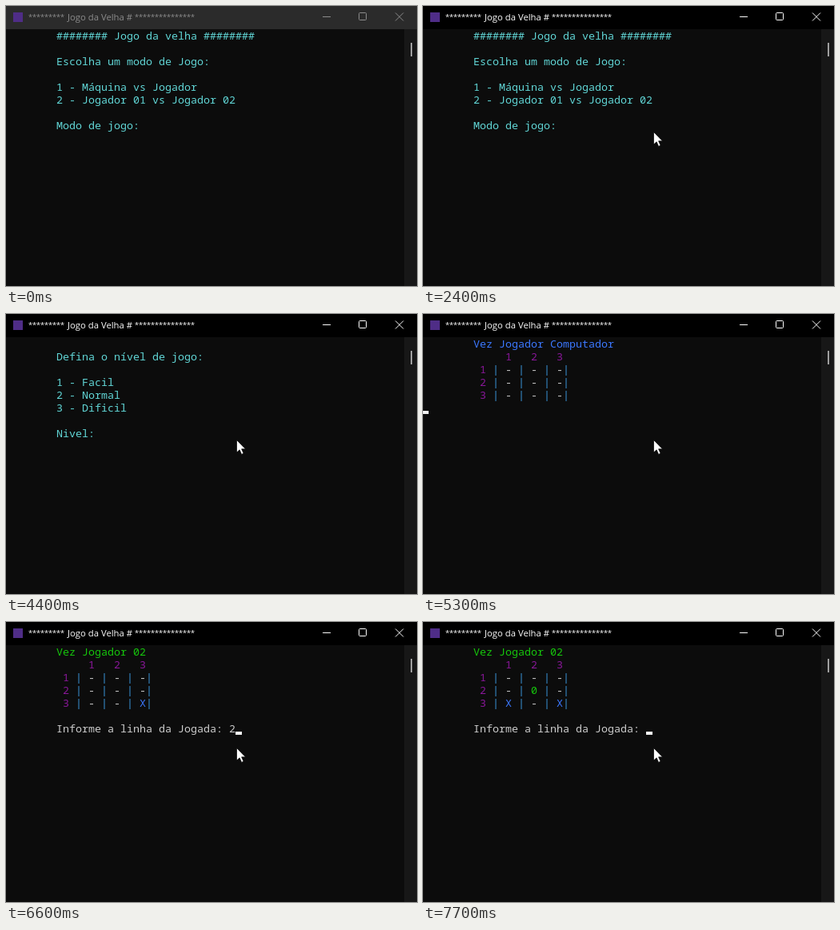
Write an HTML page that moves like this. It is 514x350 px and loops after 8000 ms.

```html
<!DOCTYPE html>
<html lang="pt">
<head>
<meta charset="utf-8">
<title>Jogo da Velha</title>
<style>
html, body { margin: 0; width: 100%; height: 100%; overflow: hidden; background: #0c0c0c; }
#win { position: absolute; left: 0; top: 0; width: 514px; height: 350px; overflow: hidden; background: #0c0c0c; }
#win > * { position: absolute; }
#chrome { left: 0; top: 0; }
#bar { fill: #2b2b2b; }
#caption { fill: #8c8c8c; font: 11.3px "Open Sans", sans-serif; }
#caption .stars { font-size: 9.07px; }
#buttons { fill: none; stroke: #8c8c8c; }
.active #bar { fill: #000; }
.active #caption { fill: #fff; }
.active #buttons { stroke: #fff; }
#screen { left: -1px; top: 29px; white-space: pre; color: #ccc;
  font: 13.333px/16px "Noto Sans Mono", monospace; font-variant-ligatures: none; }
#caret { width: 8px; height: 4px; background: #f2f2f2; }
#mouse { left: 0; top: 0; overflow: visible; }
.menu { color: #61d6d6; }
.blue { color: #3b78ff; }
.green { color: #16c60c; }
.purple { color: #881798; }
.wall { color: #3a96dd; }
</style>
</head>
<body>
<div id="win">
  <svg id="chrome" width="514" height="350">
    <rect id="bar" width="514" height="29"/>
    <rect x="9" y="8" width="12" height="12" fill="#4f2d87"/>
    <g id="caption">
      <text class="stars" x="28" y="17">*********</text>
      <text x="77" y="18">Jogo da Velha #</text>
      <text class="stars" x="161" y="17">***************</text>
    </g>
    <g id="buttons">
      <path d="M396 13.5h10M487 8.5l10 10m0-10l-10 10"/>
      <rect x="441.5" y="8.5" width="9" height="9" rx="1"/>
    </g>
    <rect x="498" y="29" width="16" height="321" fill="#171717"/>
    <rect x="506" y="46" width="2" height="17" fill="#9f9f9f"/>
  </svg>
  <div id="screen"></div>
  <div id="caret"></div>
  <svg id="mouse" width="14" height="20">
    <path d="M.5.5v15.6l3.6-3.3 2.5 5.6 2.5-1.1-2.5-5.5h4.9z" fill="#fff" stroke="#000" stroke-width=".7"/>
  </svg>
</div>
<script>
const LOOP = 8000;
const [win, screenBox, caret, mouse] =
  ['win', 'screen', 'caret', 'mouse'].map(id => document.getElementById(id));

const pad = ' '.repeat(8);
const paint = (cls, text) => `<span class="${cls}">${text}</span>`;
const menu = lines => paint('menu', lines.map(s => pad + s).join('\n'));

const modes = menu(['######## Jogo da velha ########', '', 'Escolha um modo de Jogo:', '',
  '1 - Máquina vs Jogador', '2 - Jogador 01 vs Jogador 02', '', 'Modo de jogo: ']);
const levels = menu(['', 'Defina o nível de jogo:', '', '1 - Facil', '2 - Normal', '3 - Dificil',
  '', 'Nivel: ']);

const wall = paint('wall', '|');
const mark = m => m === 'X' ? paint('blue', m) : m === '0' ? paint('green', m) : m;

function board(turn, cells) {
  const rows = [1, 2, 3].map(n => {
    const line = [...cells.slice(3 * n - 3, 3 * n)].map(m => `${wall} ${mark(m)}`).join(' ');
    return `${pad} ${paint('purple', n)} ${line}${wall}`;
  });
  return [pad + turn, paint('purple', pad + '     1   2   3'), ...rows, '', ''].join('\n');
}

const computer = paint('blue', 'Vez Jogador Computador');
const player = paint('green', 'Vez Jogador 02');
const askRow = pad + 'Informe a linha da Jogada: ';
const askCol = pad + 'Informe a coluna da Jogada: ';
const second = board(player, '--------X');

// Start time, screen content, caret column and row (no column: caret hidden)
const states = [
  [0, modes],
  [2800, modes, 22, 7],
  [3200, modes + paint('menu', '1'), 23, 7],
  [3300, modes + paint('menu', '1'), 0, 8],
  [3400, ''],
  [3500, levels, 15, 7],
  [4400, levels],
  [4900, levels, 15, 7],
  [5000, levels + paint('menu', '1'), 16, 7],
  [5200, levels + paint('menu', '1'), 0, 8],
  [5300, board(computer, '---------'), 0, 5],
  [5700, second],
  [5800, second + askRow, 35, 6],
  [6300, second + askRow],
  [6600, second + askRow + '2', 36, 6],
  [6800, second + askRow + '2\n' + askCol, 36, 7],
  [7100, second + askRow + '2\n' + askCol + '2', 37, 7],
  [7200, board(computer, '----0---X'), 0, 5],
  [7700, board(player, '----0-X-X') + askRow, 35, 6],
];

const path = [[230, 184], [257, 171], [279, 161], [288, 157]];
let shown;

function draw(now) {
  const t = now % LOOP;
  const state = states.findLast(s => s[0] <= t);
  if (state !== shown) {
    const [, html, col, row] = shown = state;
    screenBox.innerHTML = html;
    caret.hidden = col === undefined;
    caret.style.left = 8 * col - 1 + 'px';
    caret.style.top = 41 + 16 * row + 'px';
  }
  win.classList.toggle('active', t >= 2400);
  const step = Math.min(3, Math.floor((t - 400) / 100));
  mouse.style.visibility = step < 0 ? 'hidden' : 'visible';
  const [x, y] = path[Math.max(0, step)];
  mouse.style.transform = `translate(${x}px, ${y}px)`;
  requestAnimationFrame(draw);
}
draw(0);
</script>
</body>
</html>
```
